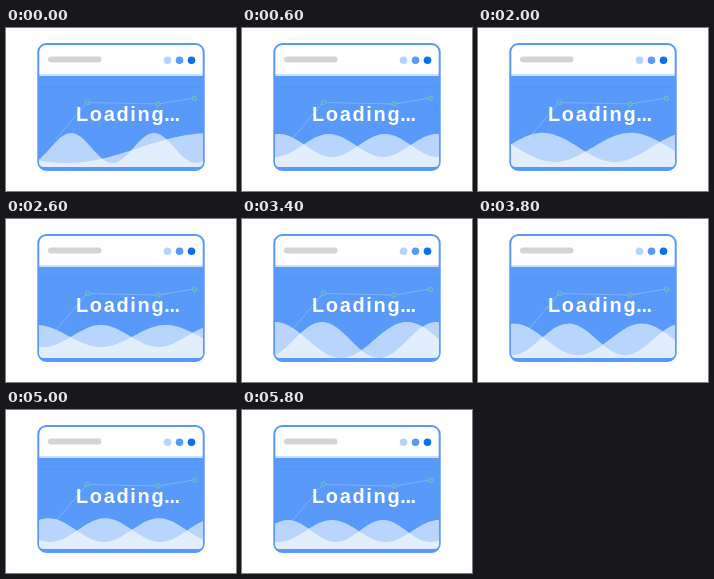
An HTML page for the animation above (6 s loop, 230x163 px).

```html
<!DOCTYPE html>
<html lang="en">
<head>
<meta charset="utf-8">
<title>Loading</title>
<style>
  html, body { margin: 0; width: 100%; height: 100%; overflow: hidden; background: #fff; }
  svg { display: block; width: 230px; height: 163px; }
  text { font: bold 20px "Liberation Sans", Arial, sans-serif; letter-spacing: 1.65px; fill: #fff; }
  .dots { letter-spacing: -.4px; }
  .wave { fill: #fff; fill-opacity: .59; }
  .marks { fill: #55b0b8; stroke: #86c0ea; stroke-width: .6; }
</style>
</head>
<body>
<svg viewBox="0 0 230 163">
  <defs>
    <clipPath id="inside"><path d="M33 48H197V134Q197 139 192 139H38Q33 139 33 134Z"/></clipPath>
  </defs>
  <path d="M32 47H198V134A8 8 0 0 1 190 142H40A8 8 0 0 1 32 134Z" fill="#5899fa"/>
  <path d="M33 47H197" stroke="#cbdffe" stroke-width="2"/>
  <rect x="32.3" y="16" width="165.4" height="126" rx="8" fill="none" stroke="#5899fa" stroke-width="2"/>
  <rect x="42" y="28.5" width="53.5" height="6" rx="3" fill="#d4d4d4"/>
  <circle cx="161.5" cy="32.2" r="3.8" fill="#b5d3fd"/>
  <circle cx="173.5" cy="32.2" r="3.8" fill="#5899fa"/>
  <circle cx="185.5" cy="32.2" r="3.8" fill="#0a70f2"/>
  <path d="M33 59.5H197" stroke="#5192f0" stroke-width=".6"/>
  <path d="M50 111L81 74.5L152 76L188.5 70" fill="none" stroke="#88b8fc" stroke-width=".8"/>
  <g class="marks">
    <circle cx="81.5" cy="74.3" r="2.3"/>
    <circle cx="152" cy="76" r="2.3"/>
    <circle cx="188.5" cy="70.3" r="2.3"/>
  </g>
  <g clip-path="url(#inside)">
    <path class="wave"/>
    <path class="wave"/>
  </g>
  <text x="70" y="93">Loading<tspan class="dots" x="158.3">...</tspan></text>
</svg>
<script>
  const LOOP = 6000, STEP = 200, LEFT = 33, RIGHT = 197, FLOOR = 140;

  // Two cosine waves breathe: their lengths stretch while one crest of each stays near its place.
  // a, b: [crest x, wavelength]; top: crest y; amp: half the wave height.
  const poses = [
    { t: 0,    a: [148, 83],  b: [205, 290], top: 105, amp: 15 },
    { t: 600,  a: [143, 106], b: [195, 108], top: 106, amp: 11.5 },
    { t: 1600, a: [148, 168], b: [209, 165], top: 104, amp: 17 },
    { t: 2600, a: [160, 130], b: [210, 115], top: 106, amp: 11 },
    { t: 3400, a: [165, 132], b: [194, 114], top: 103, amp: 18 },
    { t: 4400, a: [162, 122], b: [218, 112], top: 107, amp: 12.5 },
    { t: 5800, a: [141, 95],  b: [197, 107], top: 110, amp: 11 }
  ];
  poses.push({ ...poses[0], t: LOOP });

  const waves = document.querySelectorAll('.wave');
  const mix = (u, v, p) => u + (v - u) * p;

  function outline(crest, length, top, amp) {
    let d = `M${LEFT} ${FLOOR}`;
    for (let x = LEFT; x <= RIGHT; x += 2) {
      const y = top + amp * (1 - Math.cos(2 * Math.PI * (x - crest) / length));
      d += `L${x} ${y.toFixed(2)}`;
    }
    return d + `V${FLOOR}Z`;
  }

  function draw(now) {
    const t = Math.floor(now % LOOP / STEP) * STEP;
    const k = poses.findIndex(pose => pose.t > t);
    const from = poses[k - 1], to = poses[k];
    const p = (t - from.t) / (to.t - from.t);
    const top = mix(from.top, to.top, p), amp = mix(from.amp, to.amp, p);
    ['a', 'b'].forEach((key, i) => {
      const [crest, length] = from[key].map((v, j) => mix(v, to[key][j], p));
      waves[i].setAttribute('d', outline(crest, length, top, amp));
    });
  }

  const start = performance.now();
  function tick() {
    draw(performance.now() - start);
    requestAnimationFrame(tick);
  }
  tick();
</script>
</body>
</html>
```
